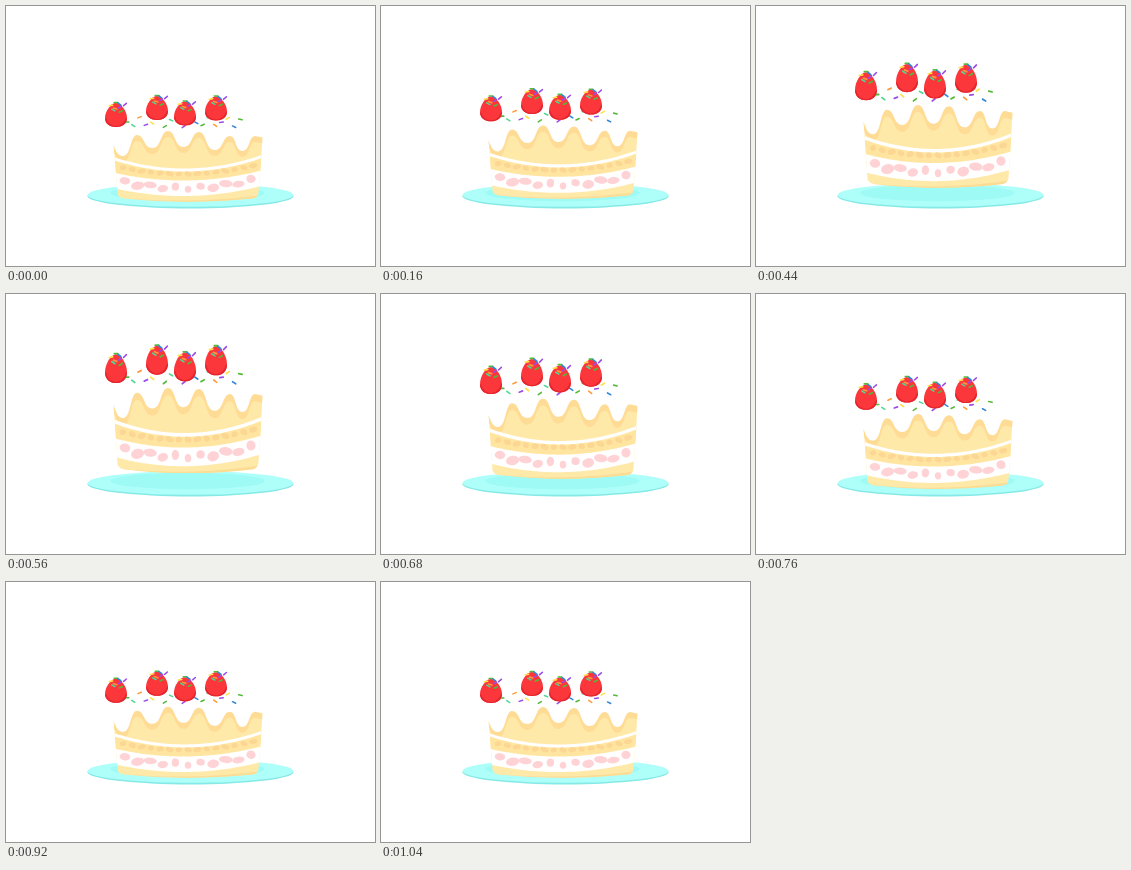
Recreate the animation shown at these times as an HTML page with a canvas. Size 369 by 260 pixels, loop 1.6 s.

```html
<!DOCTYPE html>
<html lang="en">
<head>
<meta charset="utf-8">
<title>Bouncing cake</title>
<style>
html, body { margin: 0; width: 100%; height: 100%; overflow: hidden; background: #fff; }
canvas { display: block; width: 369px; height: 260px; }
</style>
</head>
<body>
<canvas id="stage"></canvas>
<script>
const W = 369, H = 260, LOOP = 1600, STEP = 40, FLOOR = 195, MID = 182;
const canvas = document.getElementById('stage');
const ctx = canvas.getContext('2d');
const dpr = window.devicePixelRatio || 1;
canvas.width = W * dpr;
canvas.height = H * dpr;

const COLORS = ['#55b93a', '#2f86d8', '#ffe04a', '#9b4be8', '#ff9a3c', '#4fd894'];

// Straight sides, curved foot.
const body = new Path2D('M106 122 L109 155 L111.5 188 Q112 191.5 118 192.5 Q182 199 247 192.5 Q252 191.5 252.5 187 L255 155 L257 122 Z');
const fruit = new Path2D('M0 -12 C5 -12 11 -4 11 3 C11 9 6 12 0 12 C-6 12 -11 9 -11 3 C-11 -4 -5 -12 0 -12 Z');
const icing = makeIcing();

// Drips hang between neighbouring notches [x, y], each down to its own depth.
function makeIcing() {
  const notches = [[103, 137], [131, 129], [162, 125], [193, 126], [224, 130], [249, 130]];
  const depths = [150, 142, 141, 144, 145];
  const path = new Path2D();
  path.moveTo(102, 108);
  path.lineTo(...notches[0]);
  depths.forEach((low, i) => {
    const [x0, y0] = notches[i], [x1, y1] = notches[i + 1];
    const cx = (x0 + x1) / 2, w = x1 - x0;
    path.bezierCurveTo(cx - w * .25, y0, cx - w * .3, low, cx, low);
    path.bezierCurveTo(cx + w * .3, low, cx + w * .25, y1, x1, y1);
  });
  path.lineTo(259, 132);
  path.lineTo(259, 108);
  path.closePath();
  return path;
}

// Height of a layer line that hangs lowest in the middle.
function sag(x, edge, depth) {
  const u = (x - MID) / 76;
  return edge + depth * (1 - u * u) - u * 1.2;
}

function oval(x, y, rx, ry, color, turn = 0) {
  ctx.fillStyle = color;
  ctx.beginPath();
  ctx.ellipse(x, y, rx, ry, turn, 0, Math.PI * 2);
  ctx.fill();
}

function sprinkle(x, y, turn, color) {
  const dx = Math.cos(turn) * 1.8, dy = Math.sin(turn) * 1.8;
  ctx.strokeStyle = color;
  ctx.lineWidth = 1.5;
  ctx.lineCap = 'round';
  ctx.beginPath();
  ctx.moveTo(x - dx, y - dy);
  ctx.lineTo(x + dx, y + dy);
  ctx.stroke();
}

// Strip that starts at the sagging line and is thick pixels high.
function band(edge, depth, thick, color) {
  ctx.fillStyle = color;
  ctx.beginPath();
  for (let x = 104; x <= 260; x += 4) ctx.lineTo(x, sag(x, edge, depth));
  for (let x = 260; x >= 104; x -= 4) ctx.lineTo(x, sag(x, edge, depth) + thick);
  ctx.fill();
}

function berry(x, y) {
  ctx.save();
  ctx.translate(x, y);
  ctx.fillStyle = '#fb373b';
  ctx.fill(fruit);
  ctx.save();
  ctx.clip(fruit);
  ctx.strokeStyle = '#e3262e';
  ctx.lineWidth = 3;
  ctx.beginPath();
  ctx.arc(0, 1, 11.5, .3, 2.8);
  ctx.stroke();
  ctx.restore();
  for (let i = 0; i < 7; i++) {
    sprinkle(5 * Math.sin(i * 2.4), -12.5 + i * 1.5, Math.sin(i * 1.7) * .6, COLORS[i % 6]);
  }
  sprinkle(9, -10.5, -.7, COLORS[3]);
  ctx.restore();
}

function plate() {
  oval(184.5, 190.2, 103, 12.2, '#86e9e5');
  oval(184.5, 189, 103, 11.8, '#aefefa');
  oval(181.5, 187, 77, 8.2, '#9dfaf5');
}

function layers() {
  ctx.fillStyle = '#ffe9a9';
  ctx.fillRect(100, 100, 162, 100);

  ctx.save();
  ctx.translate(0, 6);
  ctx.fillStyle = '#ffdc96';
  ctx.fill(icing);
  ctx.restore();

  band(150, 13, 16, '#ffe5a0');
  band(149.5, 13, 3, '#fff');
  for (let i = 0; i < 15; i++) {
    const x = 117 + i * 9.3;
    oval(x, sag(x, 158, 10), 3.2 + i % 3 * .5, 2.4, '#fcd794', i % 2 ? .3 : -.2);
  }

  band(165, 9.5, 15.5, '#fff');
  for (let i = 0; i < 11; i++) {
    const x = 119 + i * 12.6, wave = Math.cos((i - 1.5) * .95);
    const y = sag(x, 172, 10) + (i % 2 ? 1.3 : -1.3);
    oval(x, y, 5 + wave * 1.8, 3.7 + Math.sin(i * 2) * .5, '#ffd3d5', i % 2 ? -.15 : .1);
  }
  band(190, 4.5, 8, '#fbdc95');
}

function cake() {
  ctx.save();
  ctx.clip(body);
  layers();
  ctx.restore();

  ctx.fillStyle = '#fff';
  ctx.fill(icing);
  for (let i = 0; i < 19; i++) {
    sprinkle(121 + i * 6.3, 116 + 4.8 * Math.sin(i * 2.3), Math.sin(i * 1.9) * .6, COLORS[i * 5 % 6]);
  }
  berry(151, 102);
  berry(210, 102.5);
  berry(110, 109);
  berry(179, 107.5);
}

function rise(t) {
  const u = t / 600;
  return u * u * (3 - 2 * u);
}

// The cake drops under gravity while its stretch relaxes more slowly.
function pose(t) {
  if (t >= 1040) return { hop: 0, stretch: 0 };
  if (t <= 560) return { hop: rise(t), stretch: rise(t) };
  const s = t - 560;
  return {
    hop: Math.max(0, 1 - (s / 205) ** 2),
    stretch: Math.exp(-((s / 178) ** 2))
  };
}

function draw(now) {
  const { hop, stretch } = pose(Math.floor(now % LOOP / STEP) * STEP);
  ctx.setTransform(dpr, 0, 0, dpr, 0, 0);
  ctx.fillStyle = '#fff';
  ctx.fillRect(0, 0, W, H);
  plate();
  ctx.translate(0, FLOOR - 17 * hop);
  ctx.scale(1, 1 + .207 * stretch);
  ctx.translate(0, -FLOOR);
  cake();
}

const start = performance.now();
function tick() {
  draw(performance.now() - start);
  requestAnimationFrame(tick);
}
tick();
</script>
</body>
</html>
```
